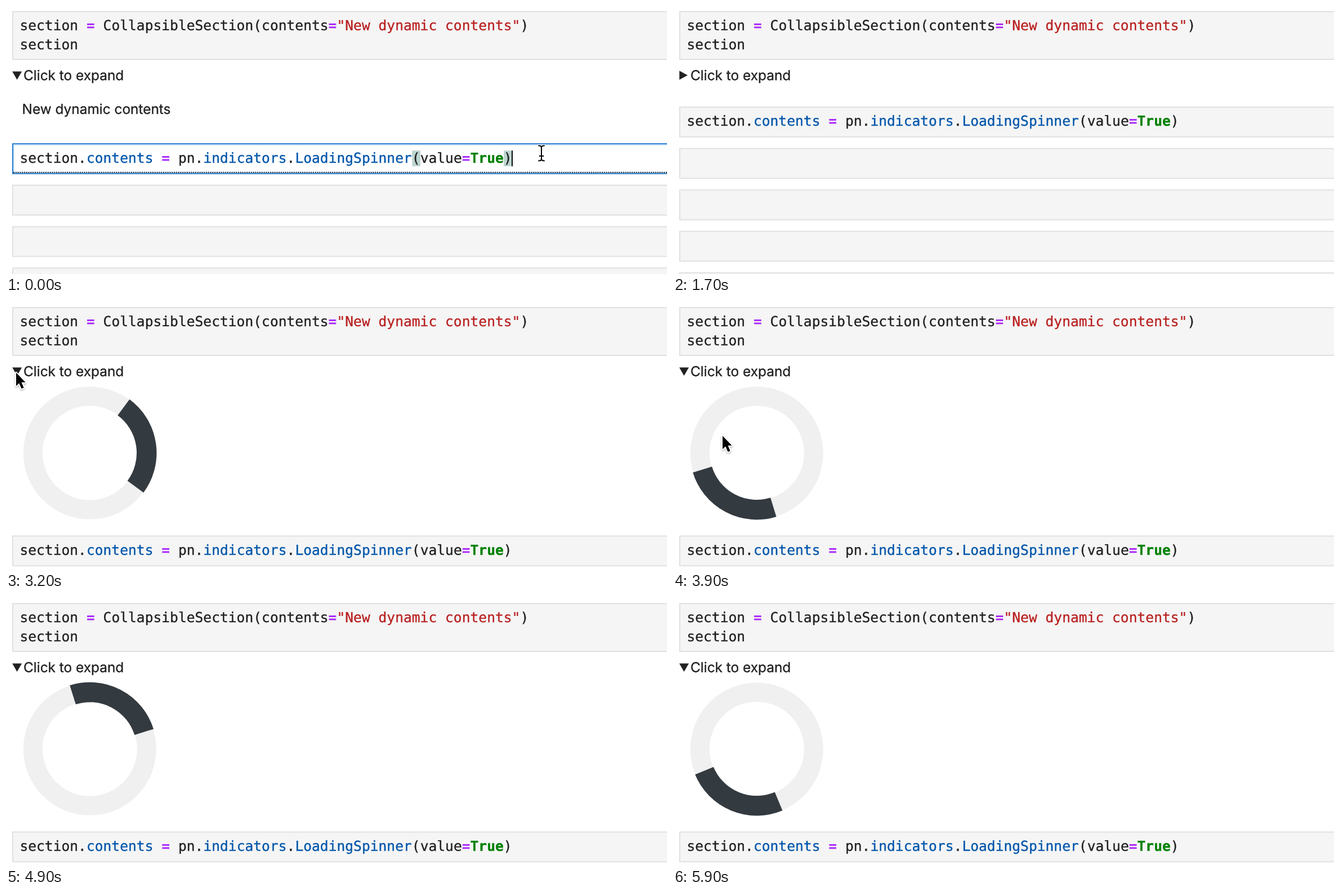
An HTML page for the animation above (6000 ms loop, 1174 by 477 pixels).

```html
<!DOCTYPE html>
<html lang="en">
<head>
<meta charset="utf-8">
<title>Collapsible section</title>
<style>
  html, body { margin: 0; width: 100%; height: 100%; overflow: hidden; background: #fff; }
  svg { display: block; width: 1174px; height: 477px; }
  text { color: #212121; white-space: pre; text-rendering: geometricPrecision; }
  text, tspan { fill: currentColor; stroke: currentColor; stroke-width: .35; }
  .code { font: 24.62px "DejaVu Sans Mono", monospace; }
  .label { font: 24.4px Inter, sans-serif; }
  .op { color: #aa22ff; font-weight: bold; stroke: none; }
  .str { color: #ba2121; }
  .prop { color: #0055aa; }
  .key { color: #008000; font-weight: bold; }
  .cell { fill: #f5f5f5; stroke: #e0e0e0; stroke-width: 1.9; }
  .ring { fill: none; stroke: #f0f0f0; stroke-width: 34; }
  #arc { stroke: #333a40; stroke-width: 35.4; }
</style>
</head>
<body>
<svg viewBox="0 0 1174 477">
  <defs>
    <filter id="shadow" x="-50%" y="-50%" width="200%" height="200%">
      <feDropShadow dx="0" dy="1.5" stdDeviation="1.5" flood-opacity=".35"/>
    </filter>
  </defs>

  <rect class="cell" x="12" y="10" width="1180" height="85"/>
  <text class="code" x="24.4" y="43">section <tspan class="op">=</tspan> CollapsibleSection(contents<tspan class="op">=</tspan><tspan class="str">"New dynamic contents"</tspan>)</text>
  <text class="code" x="24.4" y="77.2">section</text>

  <path id="marker" fill="#212121"/>
  <text class="label" x="31" y="131.6">Click to expand</text>
  <text class="label" id="message" x="28.6" y="192.2">New dynamic contents</text>

  <g id="spinner">
    <circle class="ring" cx="148.8" cy="268.7" r="101"/>
    <path class="ring" id="arc" d="M148.8 167.7A101 101 0 0 1 249.8 268.7"/>
  </g>

  <g id="cells">
    <rect class="cell" x="12" y="0" width="1180" height="53"/>
    <rect class="cell" x="12" y="73.7" width="1180" height="53"/>
    <rect class="cell" x="12" y="147.4" width="1180" height="53"/>
    <rect class="cell" x="12" y="221.1" width="1180" height="53"/>
    <rect class="cell" x="12" y="294.8" width="1180" height="53"/>
    <g id="focus">
      <rect x="12" y="0" width="1180" height="53" fill="#fff" stroke="#1976d2" stroke-width="1.9"/>
      <rect x="14" y="2" width="1180" height="49" fill="none" stroke="#64b5f6" stroke-width="2.5" opacity=".25"/>
      <path d="M13 51H1174" stroke="#212121" stroke-width="2" stroke-dasharray="2 1.8"/>
      <path d="M721.3 12h14.8v28h-14.8zM884 12h14.8v28H884z" fill="#bdd5d0"/>
      <path id="caret" d="M899 12v28" stroke="#000" stroke-width="1.9"/>
    </g>
    <text class="code" x="24.4" y="33.3">section.<tspan class="prop">contents</tspan> <tspan class="op">=</tspan> pn.<tspan class="prop">indicators</tspan>.<tspan class="prop">LoadingSpinner</tspan>(value<tspan class="op">=</tspan><tspan class="key">True</tspan>)</text>
  </g>

  <g id="pointer">
    <path id="arrow" filter="url(#shadow)" d="M1 1.3V25L6.2 20L10.6 29.8L14.6 28L10.5 18.5H17.6Z" stroke="#fff" stroke-width="3.4" paint-order="stroke" stroke-linejoin="round"/>
    <g id="beam" fill="none" stroke-linecap="round">
      <path d="M-5 -13.5Q0 -13.5 0 -10Q0 -13.5 5 -13.5M0 -10V10M-5 13.5Q0 13.5 0 10Q0 13.5 5 13.5M-3.5 5H3.5" stroke="#fff" stroke-width="4.5"/>
      <path d="M-5 -13.5Q0 -13.5 0 -10Q0 -13.5 5 -13.5M0 -10V10M-5 13.5Q0 13.5 0 10Q0 13.5 5 13.5M-3.5 5H3.5" stroke="#000" stroke-width="2"/>
    </g>
  </g>
</svg>

<script>
const LOOP = 6000, STEP = 100;
const RUN = 1100, REAPPEAR = 1800, EXPAND = 3100, LEAVE = 4200;
const CELL_HEIGHT = 53, CELL_PITCH = 73.7;

// time, x, y
const pointerPath = [
  [0, 951, 262], [100, 951, 262], [400, 949, 260], [1800, 949, 260],
  [1900, 780, 245], [2000, 380, 185], [2100, 70, 140], [2300, 30, 130],
  [2600, 18, 125], [3200, 17, 124.5], [3500, 17, 125], [3900, 87, 237],
  [4000, 340, 300], [4100, 904, 449]
];
// time, degrees
const spinPath = [
  [3100, 18.5], [3200, 36.5], [3900, 163], [4500, 270.5],
  [5300, 414.7], [5600, 463.4], [5900, 517.4]
];

const byId = id => document.getElementById(id);
const show = (id, on) => byId(id).style.display = on ? "" : "none";

function sample(path, t) {
  const next = path.findIndex(key => key[0] > t);
  if (next === 0) return path[0].slice(1);
  if (next < 0) return path[path.length - 1].slice(1);
  const a = path[next - 1], b = path[next];
  const k = (t - a[0]) / (b[0] - a[0]);
  return a.slice(1).map((v, i) => v + (b[i + 1] - v) * k);
}

function draw(t) {
  const before = t < RUN, expanded = t >= EXPAND;
  const top = before ? 245.3 : expanded ? 416.5 : 180;

  byId("cells").setAttribute("transform", `translate(0 ${top})`);
  byId("marker").setAttribute("d", before || expanded
    ? "M11.2 116.5H28.1L19.6 131.2Z" : "M11.3 115.3L26 123.3L11.3 131.3Z");
  show("message", before);
  show("focus", before);
  show("caret", t < 600);

  show("spinner", expanded);
  const [angle] = sample(spinPath, t);
  byId("arc").setAttribute("transform", `rotate(${angle} 148.8 268.7)`);

  const [x, y] = sample(pointerPath, t);
  const overEditor = y >= top && (y - top) % CELL_PITCH < CELL_HEIGHT;
  show("pointer", before || (t >= REAPPEAR && t < LEAVE));
  show("beam", overEditor);
  show("arrow", !overEditor);
  byId("pointer").setAttribute("transform", `translate(${x} ${y})`);
}

const start = performance.now();
function tick() {
  const t = (performance.now() - start) % LOOP;
  draw(Math.floor(t / STEP) * STEP);
  requestAnimationFrame(tick);
}
tick();
</script>
</body>
</html>
```
